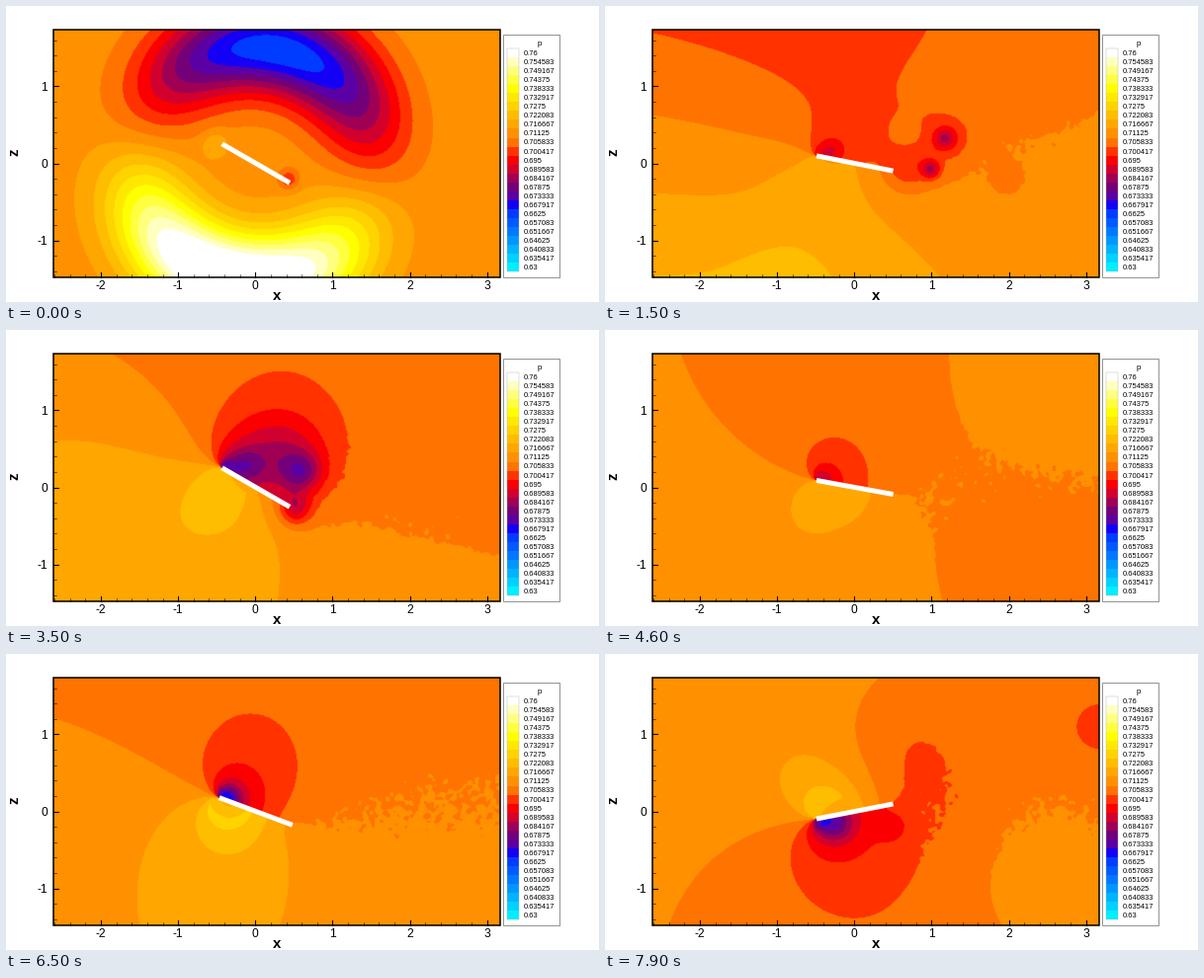
Animation of 600 by 300 pixels, one loop 8000 ms. Source, as a matplotlib script:

```python
from collections import namedtuple

import numpy as np
import matplotlib.pyplot as plt
from matplotlib.animation import FuncAnimation
from matplotlib.patches import Rectangle

W, H, FRAMES, STEP = 600, 300, 80, 100
L, T, R, B = 48, 24, 500, 275          # plot box in pixels
CX, CY, UNIT = 252.3, 159.5, 78.1      # origin and pixels per unit
NX, NY = R - L, B - T
DRIFT = 0.06                           # wake speed, units per frame

# Colour ramp: band number -> colour, 0 is the highest pressure
STOPS = [0, 4, 9, 10, 11, 12, 13, 14, 15, 16, 17, 18, 24]
RED = [255, 255, 255, 255, 255, 250, 210, 160, 115, 90, 20, 0, 0]
GREEN = [255, 255, 145, 115, 50, 0, 0, 0, 0, 0, 0, 60, 240]
BLUE = [255, 0, 0, 0, 0, 0, 45, 85, 120, 165, 245, 255, 255]
BANDS = np.arange(25)
RAMP = np.stack([np.interp(BANDS, STOPS, c) for c in (RED, GREEN, BLUE)], 1) / 255

X, Z = np.meshgrid((np.arange(NX) + L + .5 - CX) / UNIT,
                   (CY - np.arange(NY) - T - .5) / UNIT)
RADIUS, THETA = np.hypot(X, Z), np.arctan2(Z, X)


def smooth(t):
    t = np.clip(t, 0, 1)
    return t * t * (3 - 2 * t)


# Pressure state in band units: plate angle, mean level, plate loading,
# upstream tilt, slopes along x and z, start-up wave, wake roughness,
# and low-pressure spots as (x, z, strength, radius)
Pose = namedtuple('Pose', 'at angle base lift tilt sx sz wave rough spots',
                  defaults=(0, 0, 0, 0, 0, 0, ()))

startup = Pose(0, 30, 9, wave=9.3, lift=0, spots=(
    (-.52, .25, -1.6, .17), (.43, -.21, 2.4, .13)))
roll_up = Pose(8, 12, 9.1, 1.6, tilt=1.5, sx=.12, sz=.25, spots=(
    (-.28, .17, 2.5, .16), (.75, .32, 4.8, .13), (.57, -.08, 7, .12),
    (.62, .25, 1.4, .42), (1.55, -.2, 1.8, .18)))
convect = Pose(22, 10.3, 8.95, .5, rough=.06, spots=(
    (.55, 1.5, 1, 2.4), (.45, .2, .9, .6), (1.1, -.08, 2.8, .28),
    (1.1, .38, -1.4, .2), (1.67, .33, 2.2, .26), (-.7, -.3, -.6, .5),
    (-.9, -1.5, -.9, .7)))
stall = Pose(35, 30, 9.35, 2.4, sx=.08, sz=.2, rough=.08, spots=(
    (-2.3, -.5, -.9, 1.8), (.35, .35, 3, .6), (.6, .2, 3, .25),
    (-.1, .3, 1.5, .2), (.52, -.28, 3, .2)))
settle = Pose(46, 10.3, 9.35, 1.55, rough=.12, spots=(
    (2.3, -1.1, .8, 1.4), (2.7, 1.4, -1, 1.1), (0, -1, .5, .6)))
pitch_up = Pose(65, 20.5, 9.3, 2.6, sz=.13, rough=.12, spots=(
    (-.33, .17, 1.8, .14),))
pitch_down = Pose(79, -11, 9.6, -2.5, sx=.12, rough=.1, spots=(
    (-.22, -.18, 2, .2), (.6, .7, 1.4, 1), (2.6, -1, -1.2, 1.1),
    (3.15, 1.1, 1, .4), (.5, -.2, 1, .2)))
POSES = [startup, roll_up, convect, stall, settle, pitch_up, pitch_down]


def make_noise():
    n = np.random.default_rng(4).normal(size=(NY, NX))
    for axis in (0, 1) * 4:
        n = (np.roll(n, 1, axis) + n + np.roll(n, -1, axis)) / 3
    return n / n.std()


NOISE = make_noise()
WAKE = smooth((X - .5) / .6) * np.exp(-(Z / .5)**2)
UPSTREAM = 1 / (1 + np.exp(1.5 * (X - .6)))


def loading(angle, lift):
    """Thin-plate pressure: suction peak on one side, limited push on the other."""
    zeta = 2 * (X + 1j * Z) * np.exp(1j * np.radians(angle))
    g = np.sqrt((zeta - 1) / (zeta + 1)).imag
    return np.clip(lift * g, -1.1 * abs(lift), 2.4 * abs(lift))


def wave(n, height):
    """Ring pushed outwards by the impulsive start."""
    s = np.cos(THETA - np.radians(78))
    s = np.where(s > 0, s, 1.24 * s)
    return height * s * np.exp(-((RADIUS - 1.5 - .1 * n) / .6)**2)


def spots(pose, n, weight):
    total = 0
    for x, z, k, r in pose.spots:
        if x > .5 and r < .5:
            x = max(.5, x + DRIFT * (n - pose.at))
        total = total + weight * k * np.exp(-((X - x)**2 + (Z - z)**2) / r**2)
    return total


def flow(n):
    i = max(j for j in range(len(POSES) - 1) if POSES[j].at <= n)
    a, b = POSES[i], POSES[i + 1]
    w = smooth((n - a.at) / (b.at - a.at))
    p = Pose(*(u + (v - u) * w for u, v in zip(a[:-1], b[:-1])))
    f = p.base + p.sx * X + (p.sz + p.tilt * UPSTREAM) * Z
    f = f + loading(p.angle, p.lift) + wave(n, p.wave)
    f = f + spots(a, n, 1 - w) + spots(b, n, w)
    f = f + p.rough * WAKE * np.roll(NOISE, round(DRIFT * UNIT * n), 1)
    return np.clip(np.rint(f), 0, 24).astype(int), p.angle


def soften(rgb):
    for ax in (0, 1):
        pad = np.pad(rgb, [(1, 1) if i == ax else (0, 0) for i in range(3)], 'edge')
        lo, hi = (np.take(pad, np.arange(rgb.shape[ax]) + o, ax) for o in (0, 2))
        rgb = .76 * rgb + .12 * (lo + hi)
    return np.clip(rgb, 0, 1)


fig = plt.figure(figsize=(W / 100, H / 100), dpi=100, facecolor='white')
ax = fig.add_axes([0, 0, 1, 1])
ax.axis('off')


def label(x, y, s, px, **kw):
    ax.text(x, y, s, fontsize=px * .72, family='Liberation Sans',
            va='center_baseline', **kw)


def line(x, y, lw=.8):
    ax.plot(x, y, color='black', lw=lw, zorder=3)


field = ax.imshow(np.ones((NY, NX, 3)), extent=(L, R, B, T), aspect='auto',
                  interpolation='nearest', zorder=1)
plate, = ax.plot([], [], color='white', lw=5 * .72, solid_capstyle='butt', zorder=2)
ax.add_patch(Rectangle((L + .3, T + .2), NX, NY, fill=False, lw=1.1, ec='black', zorder=3))

for i in range(-13, 16):
    x, major = CX + i * UNIT / 5, i % 5 == 0
    line([x, x], [B - (5 if major else 3), B], .8 if major else .4)
    if major:
        label(x, 282.8, str(i // 5), 12, ha='center')
for i in range(-7, 9):
    y, major = CY - i * UNIT / 5, i % 5 == 0
    line([L, L + (5 if major else 3)], [y, y], .8 if major else .4)
    if major:
        label(42, y, str(i // 5), 12, ha='right')
label(274, 292.8, 'x', 15, ha='center', weight='bold')
label(8, 149.5, 'z', 15, ha='center', weight='bold', rotation=90)

ax.add_patch(Rectangle((502.5, 29), 57.5, 246, fc='white', ec='0.5', lw=.6))
label(539.5, 37.5, 'p', 8, ha='center')
for k in BANDS:
    y = 47.8 + 9.02 * k
    ax.add_patch(Rectangle((507, y - 4.5), 12, 9.02, fc=RAMP[k], lw=0))
    label(524, y, f'{.76 - .13 * k / 24:.6g}', 7.5, ha='left')
ax.add_patch(Rectangle((507, 43.3), 12, 225.5, fill=False, ec='0.7', lw=.3))
ax.set_xlim(0, W)
ax.set_ylim(H, 0)


def draw(n):
    band, angle = flow(n)
    field.set_data(soften(RAMP[band]))
    a = np.radians(angle)
    dx, dy = 39.5 * np.cos(a), 39.5 * np.sin(a)
    plate.set_data([CX + .5 - dx, CX + .5 + dx], [CY - dy, CY + dy])
    return field, plate


anim = FuncAnimation(fig, draw, frames=FRAMES, interval=STEP, repeat=True,
                     repeat_delay=0, blit=False)
plt.show()
```
